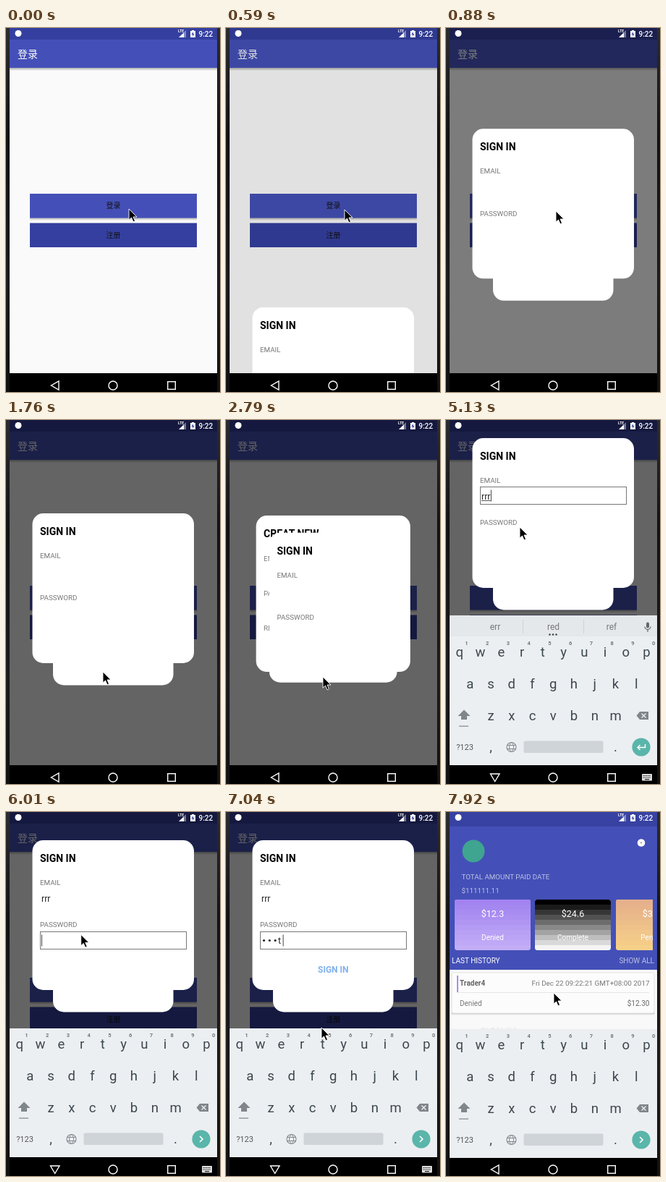
These frames come from a looping animation (296 by 503 pixels, 8 s). An HTML page:

```html
<!DOCTYPE html>
<html lang="zh">
<head>
<meta charset="utf-8">
<title>登录</title>
<style>
html, body { margin: 0; width: 100%; height: 100%; overflow: hidden; background: #000; }
svg { display: block; }
text { font-family: Roboto, "Noto Sans CJK SC", sans-serif; white-space: pre; }
</style>
</head>
<body>
<svg width="296" height="503" viewBox="0 0 296 503">
  <defs>
    <linearGradient id="shade" x2="0" y2="1">
      <stop stop-opacity=".32"/><stop offset="1" stop-opacity="0"/>
    </linearGradient>
    <linearGradient id="side" x2="0" y2="1">
      <stop stop-color="#2c2c2f"/><stop offset=".3" stop-color="#121214"/>
      <stop offset=".7" stop-color="#1c1c1e"/><stop offset="1" stop-color="#111"/>
    </linearGradient>
    <clipPath id="round" clipPathUnits="objectBoundingBox">
      <rect width="1" height="1" rx=".03" ry=".045"/>
    </clipPath>
    <clipPath id="screen"><rect x="5" width="287" height="503"/></clipPath>
  </defs>
  <rect width="296" height="503" fill="url(#side)"/>
  <g id="stage" clip-path="url(#screen)"></g>
  <path id="pointer" d="M0 0V15.2L3.5 12 6 17.8 8.5 16.7 6 11H11Z" fill="#000" stroke="#fff" stroke-width=".9"/>
</svg>
<script>
const LOOP = 8000, TICK = 440 / 3;
const stage = document.getElementById('stage');
const pointer = document.getElementById('pointer');
const BLUE = '#4450b7', NAVY = '#343f9f';

const clamp = v => Math.max(0, Math.min(1, v));
const sine = p => (1 - Math.cos(Math.PI * p)) / 2;

// y is the middle of the capitals
const text = (s, x, y, size, fill, more = '') =>
  `<text x="${x}" y="${y + size * .355}" font-size="${size}" fill="${fill}" ${more}>${s}</text>`;
const mid = (s, x, y, size, fill, more = '') => text(s, x, y, size, fill, 'text-anchor="middle" ' + more);
const end = (s, x, y, size, fill) => text(s, x, y, size, fill, 'text-anchor="end"');
const rect = (x, y, w, h, fill, more = '') =>
  `<rect x="${x}" y="${y}" width="${w}" height="${h}" fill="${fill}" ${more}/>`;
const circle = (x, y, r, fill, more = '') => `<circle cx="${x}" cy="${y}" r="${r}" fill="${fill}" ${more}/>`;
const line = (d, stroke, width = 1, more = '') =>
  `<path d="${d}" fill="none" stroke="${stroke}" stroke-width="${width}" ${more}/>`;
const shape = (d, fill) => `<path d="${d}" fill="${fill}"/>`;
const group = (s, y, opacity = 1) => `<g transform="translate(0 ${y})" opacity="${opacity}">${s}</g>`;
const crop = (s, w, h) => `<svg width="${w}" height="${h}">${s}</svg>`;

function loginPage() {
  return rect(5, 0, 288, 477, '#fafafa') + rect(5, 0, 288, 16, NAVY) +
    rect(5, 16, 288, 39, BLUE) + rect(5, 55, 288, 4, 'url(#shade)') +
    text('登录', 16, 36, 14, '#fff') +
    rect(33, 262, 231, 4, 'url(#shade)') + rect(33, 229, 231, 33.5, BLUE) +
    mid('登录', 148.5, 245.5, 10, '#111') +
    rect(33, 269.5, 231, 33.5, NAVY) + mid('注册', 148.5, 286.5, 10, '#111');
}

function statusIcons() {
  return circle(17, 7.5, 4.5, '#fff') +
    text('LTE', 238, 4.5, 5, '#fff', 'font-weight="700"') +
    shape('M249 3V13H239Z', '#ffffff66') + shape('M246 6.5V13H239Z', '#fff') +
    shape('M255 4H257V3H260V4H262V13H255Z', '#fff') + shape('M259 5L256.5 9H258.3L258 12 260.5 8H258.7Z', NAVY) +
    text('9:22', 266.5, 8, 10, '#fff', 'font-weight="500"');
}

function navBar(typing) {
  const back = typing ? 'M61.5 489H74L67.7 499.5Z' : 'M73 488V500L62.5 494Z';
  let s = rect(5, 477, 288, 26, '#000') + line(back, '#fff', 1.4) +
    circle(148, 494, 6, 'none', 'stroke="#fff" stroke-width="1.4"') +
    rect(223.7, 488.7, 10.6, 10.6, 'none', 'stroke="#fff" stroke-width="1.4"');
  if (typing) s += rect(271, 489, 14, 9.5, '#ddd', 'rx="1"') +
    line('M272.5 491.5H283.5M272.5 494H283.5', '#000', 1.2, 'stroke-dasharray="1.2 1"') +
    line('M275 496.7H281', '#000');
  return s;
}

function card(left, top, height, title, labels, gap, first) {
  const x = left + 10.5;
  return rect(left, top, 296.5 - 2 * left, height, '#fff', 'rx="15"') +
    text(title, x, top + 25, 14, '#000', 'font-weight="700"') +
    labels.map((s, i) => text(s, x, top + first + gap * i, 9.8, '#777')).join('');
}

const field = (y, caretX) => rect(47.5, y, 202, 24, 'none', 'stroke="#777"') +
  rect(caretX, y + 4, 1, 16, '#444');

function formState(n, top) {
  const letters = [30, 32, 34].filter(k => n >= k).length;
  const secret = [42, 44, 46, 47].filter(k => n >= k).length;
  const inEmail = n >= 26 && n < 37;
  let s = text('r'.repeat(letters), 49, top + 80.5, 12.3, '#222');
  if (inEmail) {
    const w = letters * 4.3;
    s += field(top + 67.5, 49 + w) + (w ? rect(49, top + 86, w, .9, '#444') : '');
  }
  if (n >= 37) {
    for (let i = 0; i < secret - 1; i++) s += circle(52.5 + 7.8 * i, top + 138.5, 1.6, '#222');
    const x = 49 + 7.7 * Math.max(0, secret - 1);
    if (secret) s += text(secret > 3 ? 't' : 'r', x, top + 138.5, 12.3, '#222');
    s += field(top + 126.5, x + (secret ? 6.5 : 0));
  }
  if (secret > 2) s += mid('SIGN IN', 148.3, top + 178.5, 12, '#7fb0ec', 'font-weight="700"');
  return s;
}

function dialog(n, prog) {
  const swap = n <= 18 ? prog(12, 3.6) : 1 - prog(18, 3.6);
  const inset = 28.5 * sine(swap);
  const top = 129 + 37 * swap;
  const signIn = card(36.5 + inset, top, 207, 'SIGN IN', ['EMAIL', 'PASSWORD'], 58.5, 58.5) + formState(n, top);
  const create = card(65 - inset, 150.5 - 25.5 * swap, 216, 'CREAT NEW', ['EMAIL', 'PASSWORD', 'RE-PASSWORD'], 48, 59);
  const rise = 370 * (1 - prog(3.5, 3)) ** 2;
  const lift = 104 * sine(prog(25, 3.15)) - 14 * sine(prog(37, 2));
  const leave = prog(51, 4.2);
  return group(n > 12 && n <= 18 ? signIn + create : create + signIn,
    rise - lift + 470 * leave ** 2, clamp(1 - leave / .76));
}

function keyboard(n) {
  const ink = '#3d474d', grey = '#80868a';
  let s = rect(5, 299, 288, 178, '#eceff2');
  if (n < 37) {
    s += rect(5, 270, 288, 29, '#e5e8eb') + line('M106.5 276V295M190.5 276V295', '#cfd3d6') +
      rect(277, 279.5, 4, 8, '#666', 'rx="2"') + line('M275 285.5a4 4 0 0 0 8 0M279 289.5V293', '#666', 1.2);
    if (n >= 30) s += ['err', 'red', 'ref'].map((w, i) => mid(w, 68 + 80.5 * i, 286, 12, '#777')).join('') +
      [143.5, 148, 152.5].map(x => circle(x, 296.5, 1.3, '#444')).join('');
  }
  [['qwertyuiop', 18.8, 320], ['asdfghjkl', 33.2, 364], ['zxcvbnm', 62, 408]].forEach(([keys, x, y]) =>
    [...keys].forEach((k, i) => s += mid(k, x + 28.75 * i, y, 18.5, ink)));
  for (let i = 0; i < 10; i++) s += mid((i + 1) % 10, 28.3 + 28.75 * i, 308, 7.5, '#777', 'font-weight="700"');
  s += shape('M25 400.5L33.5 409H29V414H21V409H16.5Z', grey) + rect(18, 422.5, 13, 1.2, grey) +
    shape('M263.5 408.5L268 403H280V414H268Z', grey) + line('M270.5 405.5L276.5 411.5M276.5 405.5L270.5 411.5', '#eceff2', 1.3) +
    mid('?123', 26, 452, 11, '#555') + mid(',', 62, 451.5, 18.5, ink) + mid('.', 234.5, 451.5, 18.5, ink) +
    circle(90.5, 452, 6.5, 'none', `stroke="${grey}" stroke-width="1.1"`) +
    line('M84.5 449.5H96.5M84.5 454.5H96.5M90.5 445.5C86.5 449 86.5 455 90.5 458.5C94.5 455 94.5 449 90.5 445.5', grey) +
    rect(107.5, 443.5, 110, 16.5, '#cfd4d8', 'rx="2"') + circle(270, 452, 12.6, '#5ab5aa');
  s += n < 37 ? line('M275.5 448V452.5H265M268.5 449L265 452.5 268.5 456', '#fff', 1.5)
    : line('M268 448L272 452 268 456', '#fff', 1.6);
  return s;
}

function tile(x, from, to, price, state) {
  let bands = rect(x, 121, 105, 70, to);
  for (let i = 0; i < 10; i++) bands += rect(x, 121 + 7 * i, 105, 7, from, `opacity="${1 - i / 9}"`);
  return `<g clip-path="url(#round)">${bands}</g>` +
    mid(price, x + 52.5, 140.5, 12.5, '#fff') + mid(state, x + 52.5, 173, 10, '#fff');
}

function homePage() {
  const pale = '#bcc1e4';
  return rect(5, 16, 288, 487, '#f9f9f9') + rect(5, 0, 288, 218, BLUE) + rect(5, 0, 288, 20, '#3742a2') +
    circle(38, 54, 15.5, '#3fa490') + circle(270, 42.5, 5.3, '#fff') + circle(270, 42.5, 1.3, '#aaa') +
    text('TOTAL AMOUNT PAID DATE', 21.5, 89.5, 9.8, pale) + text('$111111.11', 21.5, 108.5, 9.8, pale) +
    crop(tile(12, '#a283f0', '#c2adf6', '$12.3', 'Denied') +
      tile(123, '#000', '#f4f4f4', '$24.6', 'Complete') +
      tile(235, '#e6b08c', '#f5d088', '$36.9', 'Pending'), 286, 503) +
    text('LAST HISTORY', 8, 205, 10, '#fff') + end('SHOW ALL', 288, 205, 10, pale) +
    rect(7.5, 276, 281, 5, 'url(#shade)', 'rx="2"') +
    rect(8, 222, 280, 56, '#fcfcfc', 'rx="2" stroke="#ddd" stroke-width=".8"') +
    rect(15, 226, 2, 23, '#a98bea') + rect(15, 249, 266, .8, '#e2e2e2') +
    text('Trader4', 19, 236.5, 10, '#666', 'font-weight="700"') +
    end('Fri Dec 22 09:22:21 GMT+08:00 2017', 281.5, 236.5, 9.9, '#777') +
    text('Denied', 19, 264.5, 10, '#777') + end('$12.30', 281.5, 264.5, 10, '#666');
}

// tick, x, y
const PATH = [[0, 170, 250], [3, 170, 250], [6, 152, 253], [8, 134, 346], [10, 134, 348], [12, 134, 348],
  [17, 134, 355], [20, 134, 355], [24, 92, 184], [25, 90, 186], [26, 89, 207], [33, 89, 207], [35, 102, 148],
  [36, 103, 163], [43, 104, 172], [47, 130, 316], [48, 132, 298], [50, 146, 220], [52, 148, 220], [54, 149, 250]];

function movePointer(n) {
  const i = Math.max(1, PATH.findIndex(p => p[0] >= n));
  const [a, b] = [PATH[i - 1], PATH[i]];
  const p = (n - a[0]) / (b[0] - a[0]);
  pointer.setAttribute('transform', `translate(${a[1] + (b[1] - a[1]) * p} ${a[2] + (b[2] - a[2]) * p})`);
}

function draw(n) {
  const prog = (start, length) => clamp((n - start) / length);
  const dim = .6 * prog(3.5, 3) * (1 - prog(51, 3));
  const home = prog(51.5, 2);
  stage.innerHTML = loginPage() + rect(5, 0, 288, 477, '#000', `opacity="${dim}"`) +
    (home ? group(homePage(), 40 * (1 - home) ** 2, home) : '') +
    statusIcons() + (n > 3 ? dialog(n, prog) : '') + navBar(n >= 26 && n < 53) +
    (n > 26 ? crop(group(keyboard(n), n > 53 ? 1 : 207 * (1 - sine(prog(26, 3)))), 296, 478) : '');
  movePointer(n);
}

let last = -1;
function loop() {
  const n = Math.min(54, Math.floor((performance.now() % LOOP + 12) / TICK));
  if (n !== last) draw(last = n);
  requestAnimationFrame(loop);
}
loop();
</script>
</body>
</html>
```
